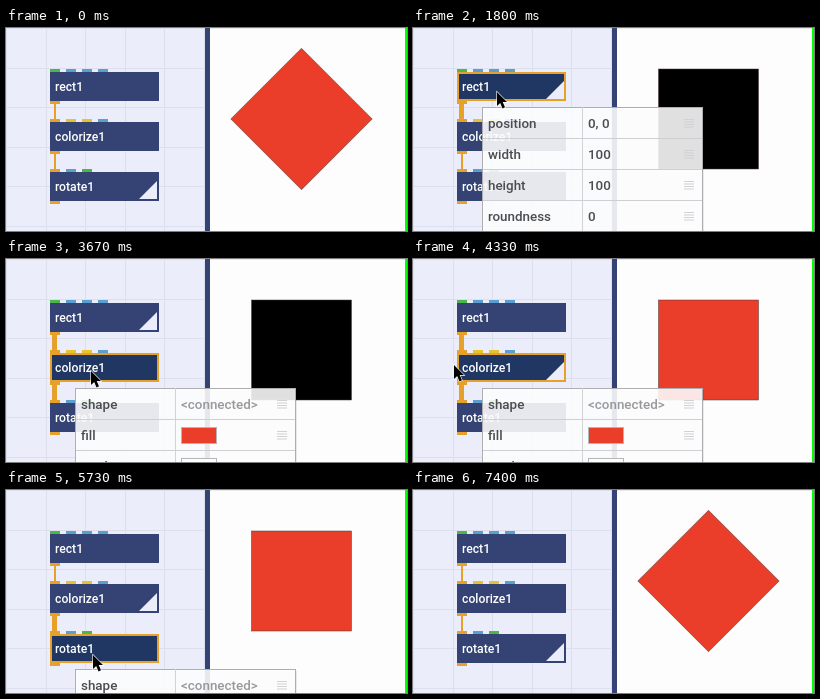
An HTML page for the animation above (8340 ms loop, 401 by 203 pixels).

```html
<!DOCTYPE html>
<html lang="en">
<head>
<meta charset="utf-8">
<title>Node editor</title>
<style>
  html, body { margin: 0; width: 100%; height: 100%; overflow: hidden; background: #fdfdfd; }
  svg { display: block; width: 401px; height: 203px; }
  text { font-family: Roboto, "Open Sans", sans-serif; font-weight: 500; }
  .name { font-size: 12.2px; fill: #fff; }
  .row { font-size: 13.4px; fill: #4c4c50; }
  .row.dim { fill: #98989c; }
</style>
</head>
<body>
<svg id="stage" viewBox="0 0 401 203" xmlns="http://www.w3.org/2000/svg"></svg>
<script>
const LOOP = 8340, FPS = 15;
const NAVY = '#344374', HOVER = '#203663', ORANGE = '#e6a12b', RED = '#ea3d2a';
const PORT = { g: '#4cb749', b: '#5a9fd0', o: ORANGE, y: '#e6c32f' };

const NODES = [
  { name: 'rect1', ports: 'gbbb',
    rows: [['position', '0, 0'], ['width', '100'], ['height', '100'], ['roundness', '0']] },
  { name: 'colorize1', ports: 'oyyb',
    rows: [['shape', '<connected>'], ['fill', RED], ['stroke', '#fdfdfd']] },
  { name: 'rotate1', ports: 'obg', rows: [['shape', '<connected>']] }
];

// Step tables: [step, node index], -1 means none
const SELECTED = [[0, -1], [23, 0], [43, -1], [55, 1], [70, -1], [83, 2], [98, -1]];
const HOVERED = [[0, -1], [23, 0], [37, -1], [46, 1], [66, -1], [76, 2], [89, -1]];
const RENDERED = [[0, 2], [27, 0], [59, 1], [87, 2]];

// Pointer stops: [step, x, y]
const PATH = [
  [15, 72, 35], [18, 82, 59], [22, 82, 59], [23, 84, 64], [33, 84, 64], [40, 25, 106],
  [43, 25, 106], [49, 85, 112], [63, 85, 112], [65, 41, 106], [67, 21, 106],
  [74, 21, 106], [77, 87, 165], [87, 87, 165], [93, 0, 163], [98, 0, 163],
  [105, 40, 142], [108, 40, 142], [111, 20, 162]
];

const stage = document.getElementById('stage');

function add(parent, tag, attrs, text) {
  const el = document.createElementNS('http://www.w3.org/2000/svg', tag);
  for (const k in attrs) el.setAttribute(k, attrs[k]);
  if (text) el.textContent = text;
  parent.appendChild(el);
  return el;
}
const box = (p, x, y, width, height, fill, more) =>
  add(p, 'rect', { x, y, width, height, fill, ...more });
const show = (el, on) => el.setAttribute('visibility', on ? 'visible' : 'hidden');

function drawBackdrop() {
  box(stage, 0, 0, 200, 203, '#ebeefa');
  for (let i = 0; i < 6; i++) {
    const p = Math.round(i * 39.6);
    if (p < 199) box(stage, p, 0, 1, 203, '#dcdfec');
    box(stage, 0, p, 199, 1, '#dcdfec');
  }
  box(stage, 204, 0, 195, 203, '#fdfdfd');
  box(stage, 204, 0, 195, 1, '#e9e9ec');
  box(stage, 199, 0, 5, 203, NAVY);
  box(stage, 399, 0, 2, 203, '#0f0');
}

function drawNode(node, i) {
  const y = 44 + i * 50;
  [...node.ports].forEach((c, k) => box(stage, 44 + k * 16, y - 3, 10, 3, PORT[c]));
  box(stage, 44, y + 29, 10, 3, ORANGE);
  node.body = box(stage, 44, y, 109, 29, NAVY);
  node.flag = add(stage, 'path', { d: `M133 ${y + 27}L151 ${y + 9}V${y + 27}Z`, fill: '#ebeefa' });
  node.frame = box(stage, 45, y + 1, 107, 27, 'none', { stroke: ORANGE, 'stroke-width': 2 });
  add(stage, 'text', { class: 'name', x: 49, y: y + 19 }, node.name);
}

function drawMenu(node, i) {
  const top = 79 + i * 50, h = node.rows.length * 31;
  const g = node.menu = add(stage, 'g', {});
  box(g, 71, top + 2, 220, h, '#000', { opacity: .08 });
  box(g, 69.5, top + .5, 220, h, '#fff', { 'fill-opacity': .88, stroke: '#adadb2' });
  box(g, 169, top, 1, h, '#d3d3d6');
  node.rows.forEach(([label, value], r) => {
    const mid = top + 16 + r * 31;
    if (r) box(g, 70, mid - 16, 219, 1, '#cfcfd3');
    add(g, 'text', { class: 'row', x: 75, y: mid + 4.5 }, label);
    if (value[0] === '#') {
      box(g, 175.5, mid - 7.5, 35, 16, value, { stroke: '#b5b5b8' });
    } else {
      add(g, 'text', { class: value[0] === '<' ? 'row dim' : 'row', x: 175, y: mid + 4.5 }, value);
    }
    for (let k = 0; k < 4; k++) box(g, 271, mid - 4 + k * 2.5, 10, 1, '#d2d2d5');
  });
}

drawBackdrop();
const shape = box(stage, 245.5, 41, 100, 100, RED, { stroke: '#4a3a36', 'stroke-width': .5 });
const wires = [0, 1].map(i => box(stage, 48, 73 + i * 50, 2, 21, ORANGE));
NODES.forEach(drawNode);
NODES.forEach(drawMenu);
const pointer = add(stage, 'path', {
  d: 'M0 0V14L3.2 11L5.5 16.4L8 15.3L5.7 10.1H10Z',
  fill: '#000', stroke: '#fff', 'stroke-width': 1.2, 'paint-order': 'stroke'
});

function valueAt(table, step) {
  let v = table[0][1];
  for (const [at, next] of table) if (step >= at) v = next;
  return v;
}

function pointerAt(step) {
  const n = PATH.findIndex(p => p[0] > step);
  if (n < 1) return null;
  const [s0, x0, y0] = PATH[n - 1], [s1, x1, y1] = PATH[n];
  const u = (step - s0) / (s1 - s0);
  const e = s1 - s0 > 4 ? u * u * (3 - 2 * u) : u;
  return [x0 + (x1 - x0) * e, y0 + (y1 - y0) * e];
}

function render(ms) {
  const step = Math.floor(ms * FPS / 1000 + .1);
  const sel = valueAt(SELECTED, step), hov = valueAt(HOVERED, step), out = valueAt(RENDERED, step);
  NODES.forEach((node, i) => {
    node.body.setAttribute('fill', i === hov ? HOVER : NAVY);
    show(node.flag, i === out);
    show(node.frame, i === sel);
    show(node.menu, i === sel);
  });
  wires.forEach((wire, i) => {
    const thick = sel === i || sel === i + 1;
    wire.setAttribute('x', thick ? 46 : 48);
    wire.setAttribute('width', thick ? 5 : 2);
  });
  shape.setAttribute('fill', out ? RED : '#000');
  shape.setAttribute('transform', `rotate(${out === 2 ? 45 : 0} 295.5 91)`);
  const p = pointerAt(step);
  show(pointer, p);
  if (p) pointer.setAttribute('transform', `translate(${p[0]} ${p[1]})`);
}

const start = performance.now();
function tick() {
  render((performance.now() - start) % LOOP);
  requestAnimationFrame(tick);
}
tick();
</script>
</body>
</html>
```
